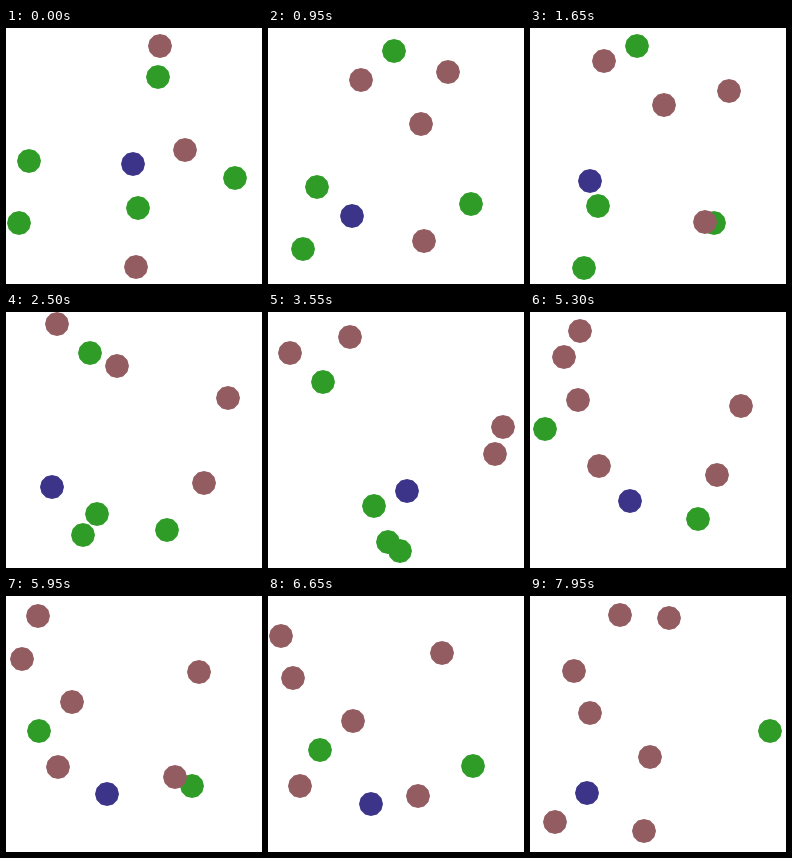
These frames come from a looping animation (256x256 px, 8000 ms). An HTML page with a canvas:

```html
<!DOCTYPE html>
<html lang="en">
<head>
<meta charset="utf-8">
<title>Catch the green balls</title>
<style>
  html, body { margin: 0; width: 100%; height: 100%; overflow: hidden; background: #fff; }
  canvas { display: block; width: 256px; height: 256px; }
</style>
</head>
<body>
<canvas id="stage" width="256" height="256"></canvas>
<script>
const ctx = document.getElementById('stage').getContext('2d');
const LOOP = 8000, STEP = 50;
const SPEED = 0.02733; // px per ms along each axis
const RADIUS = 12, SIDES = 12, REACH = 21;
const LOW = 11, HIGH = 242.8;
const GREEN = '#309c28', RED = '#925c60', BLUE = '#3c3488';

// A ball flies diagonally from (x, y); dx and dy are 1 or -1
const ball = (color, x, y, dx, dy) =>
  ({ color, x, y, dx, dy, start: 0, end: LOOP });

const greens = [
  ball(GREEN, 152, 49.4, -1, -1),
  ball(GREEN, 23, 133.4, 1, 1),
  ball(GREEN, 229, 150, -1, 1),
  ball(GREEN, 13, 194.6, -1, 1),
  ball(GREEN, 132, 180, -1, -1)
];
const reds = [
  ball(RED, 154, 18, 1, 1),
  ball(RED, 179, 122, -1, -1),
  ball(RED, 129.6, 239, 1, -1)
];
// Each catch releases the next of these
const spares = [
  ball(RED, 119, 78.4, -1, -1),
  ball(RED, 194.8, 164.2, -1, -1),
  ball(RED, 214.2, 8.7, -1, 1),
  ball(RED, 307.3, 236.3, -1, -1)
];

// Player's way: time, x, y
const path = [
  [0, 127, 136], [950, 84, 188], [1400, 80, 146], [2050, 27, 165],
  [2500, 46, 175], [3550, 139, 179], [5300, 100, 189],
  [6650, 103, 208], [7300, 78, 190], [LOOP, 55.4, 197.5]
];

// Reflects a coordinate between the walls
function bounce(v) {
  const span = HIGH - LOW, turn = 2 * span;
  const u = ((v - LOW) % turn + turn) % turn;
  return LOW + (u > span ? turn - u : u);
}

function ballAt(b, t) {
  const d = t * SPEED;
  return [bounce(b.x + b.dx * d), bounce(b.y + b.dy * d)];
}

function playerAt(t) {
  const i = path.findIndex(p => p[0] > t);
  const [t0, x0, y0] = path[i - 1], [t1, x1, y1] = path[i];
  const k = (t - t0) / (t1 - t0);
  return [x0 + (x1 - x0) * k, y0 + (y1 - y0) * k];
}

// Work out the catches once, so that any moment can be drawn on its own
function planCatches() {
  let next = 0;
  for (let t = 0; t < LOOP; t += STEP) {
    const [px, py] = playerAt(t);
    for (const g of greens) {
      const [x, y] = ballAt(g, t);
      if (g.end < LOOP || Math.hypot(x - px, y - py) >= REACH) continue;
      g.end = t;
      if (next < spares.length) spares[next++].start = t;
    }
  }
}

function disc(color, [x, y]) {
  ctx.fillStyle = color;
  ctx.beginPath();
  for (let i = 0; i < SIDES; i++) {
    const a = i / SIDES * 2 * Math.PI;
    ctx.lineTo(Math.round(x) + RADIUS * Math.cos(a), Math.round(y) + RADIUS * Math.sin(a));
  }
  ctx.fill();
}

function draw(t) {
  ctx.fillStyle = '#fff';
  ctx.fillRect(0, 0, 256, 256);
  for (const b of balls) {
    if (t >= b.start && t < b.end) disc(b.color, ballAt(b, t));
  }
  disc(BLUE, playerAt(t));
}

function tick() {
  const t = performance.now() % LOOP;
  draw(Math.floor(t / STEP) * STEP);
  requestAnimationFrame(tick);
}

planCatches();
const balls = [...greens, ...reds, ...spares];
tick();
</script>
</body>
</html>
```
